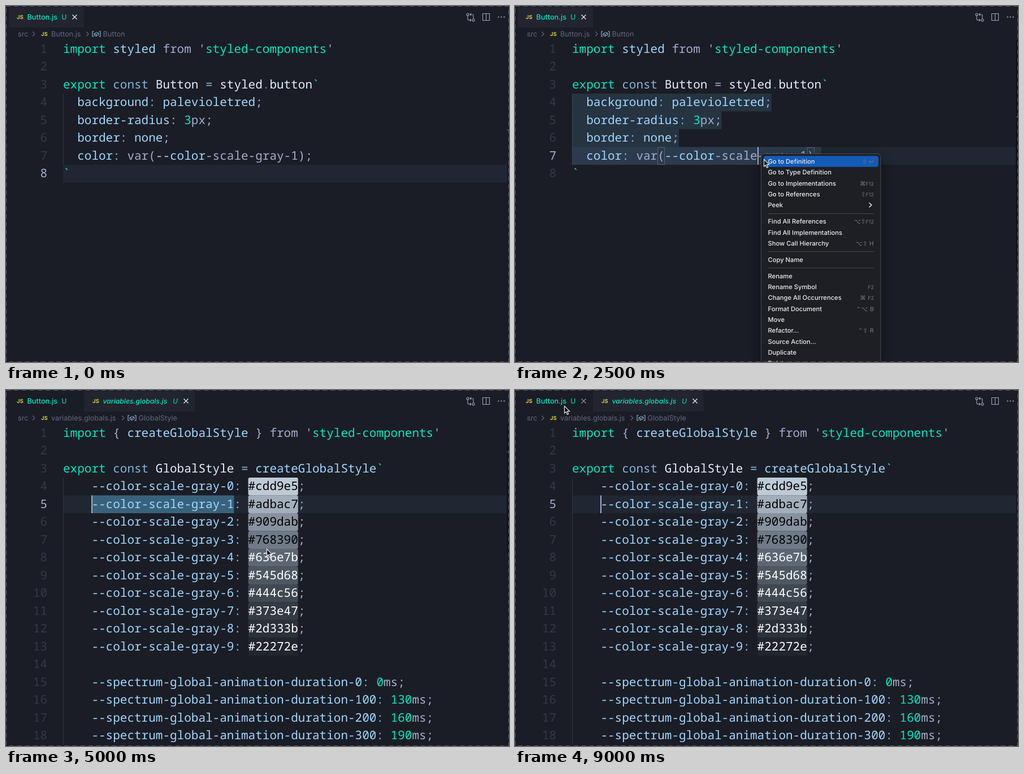
Write an HTML page with a canvas that moves like this. It is 890 px wide and 630 px high and loops after 9500 ms.

```html
<!DOCTYPE html>
<html lang="en">
<head>
<meta charset="utf-8">
<title>Go to definition</title>
<style>
html, body { margin: 0; width: 100%; height: 100%; overflow: hidden; background: #1a1d26; }
canvas { display: block; width: 890px; height: 630px; }
</style>
</head>
<body>
<canvas id="stage" width="890" height="630"></canvas>
<script>
const ctx = document.getElementById('stage').getContext('2d');
const LOOP = 9500, STEP = 250;
const LEFT = 101, TOP = 60.5, CELL = 12.6, LINE = 31.5;
const MONO = '500 21px "Noto Sans Mono", monospace';
const UI = 'Inter, sans-serif';
const MINT = '#05e6be', DIM = '#626780', ICON = '#a0a4b8';
const INK = { g: MINT, b: '#a0d8fd', t: '#a6accd', w: '#e4f0fb', c: '#86b4d8', d: '#767c9d' };

// Code lines: "§x" switches to ink x
const button = [
  "§gimport §bstyled §tfrom '§gstyled-components§t'",
  '',
  '§gexport §cconst §wButton §c= §wstyled§d.§wbutton§g`',
  '  §bbackground§c: §bpalevioletred§t;',
  '  §bborder-radius§c: §g3§tpx;',
  '  §bborder§c: §bnone§t;',
  '  §bcolor§c: §tvar(§b--color§t-scale-gray-1);',
  '§g`'
];
const grays = ['#cdd9e5', '#adbac7', '#909dab', '#768390', '#636e7b',
  '#545d68', '#444c56', '#373e47', '#2d333b', '#22272e'];
const globals = [
  "§gimport §t{ §bcreateGlobalStyle §t} from '§gstyled-components§t'",
  '',
  '§gexport §cconst §wGlobalStyle §c= §bcreateGlobalStyle§g`',
  ...grays.map((_, i) => `    §b--color-scale-gray-${i}§c:${' '.repeat(8)}§t;`),
  '',
  ...[0, 130, 160, 190].map((ms, i) =>
    `    §b--spectrum-global-animation-duration-${i * 100}§c: §g${ms}§tms;`)
];

const menu = [
  ['Go to Definition', '⇧ ↩'], ['Go to Type Definition', ''],
  ['Go to Implementations', '⌘F12'], ['Go to References', '⇧F12'], ['Peek', '>'], null,
  ['Find All References', '⌥⇧F12'], ['Find All Implementations', ''],
  ['Show Call Hierarchy', '⌥⇧ H'], null,
  ['Copy Name', ''], null,
  ['Rename', ''], ['Rename Symbol', 'F2'], ['Change All Occurrences', '⌘ F2'],
  ['Format Document', '⌃⌥ B'], ['Move', ''], ['Refactor...', '⌃⇧ R'],
  ['Source Action...', ''], ['Duplicate', ''], ['Delete', '']
];

// Pointer path: time, x, y
const path = [
  [250, 440, 290], [500, 431, 228], [750, 431, 232], [1250, 430, 268], [2250, 430, 268],
  [2500, 440, 271], [2750, 450, 274], [3500, 454, 277], [4000, 458, 294],
  [4250, 461, 281], [5000, 461, 281], [6000, 384, 206], [6250, 383, 202],
  [7500, 383, 202], [8750, 90, 32], [9000, 87, 28]
];

function pointerAt(t) {
  if (t < path[0][0]) return null;
  const i = path.findIndex(p => p[0] > t);
  if (i < 0) return path[path.length - 1].slice(1);
  const [a, b] = [path[i - 1], path[i]];
  const k = (t - a[0]) / (b[0] - a[0]);
  return [a[1] + (b[1] - a[1]) * k, a[2] + (b[2] - a[2]) * k];
}

function rect(x, y, w, h, color) {
  ctx.fillStyle = color;
  ctx.fillRect(x, y, w, h);
}

function round(x, y, w, h, r, color) {
  ctx.beginPath();
  ctx.roundRect(x, y, w, h, r);
  ctx.fillStyle = color;
  ctx.fill();
}

function text(str, x, y, font, color, align = 'left') {
  ctx.font = font;
  ctx.textAlign = align;
  ctx.fillStyle = color;
  ctx.fillText(str, x, y);
}

function stroke(d, color, width = 1) {
  ctx.strokeStyle = color;
  ctx.lineWidth = width;
  ctx.stroke(new Path2D(d));
}

const colX = col => LEFT + col * CELL;
const lineY = n => TOP + (n - 1) * LINE;
const baseline = n => lineY(n) + 22;

function codeLine(src, n) {
  let col = 0;
  src.split('§').forEach((part, i) => {
    const str = i ? part.slice(1) : part;
    if (str.trim()) text(str, colX(col), baseline(n), MONO, INK[part[0]]);
    col += str.length;
  });
}

const jsBadge = (x, y) => text('JS', x, y, `700 9.5px ${UI}`, '#cbcb41');
const chevron = (x, y, color) => stroke(`M${x - 2} ${y - 4}l4 4l-4 4`, color, 1.1);
const cross = (x, color) => stroke(`M${x - 4} 15.5l8 8m0 -8l-8 8`, color, 1.2);

function tab(x, name, nameEnd, italic) {
  const font = `${italic ? 'italic 500 12.2px' : '500 12.7px'} ${UI}`;
  jsBadge(x, 22.5);
  text(name, x + 18.5, 24, font, MINT);
  text('U', nameEnd + 6, 24, font, '#08bfa0');
}

function header(second, pointer) {
  if (second) rect(138, 2, 196, 36, '#22252f');
  else rect(5, 2, 133, 36, '#22252f');
  tab(19, 'Button.js', 92);
  if (second) {
    tab(153, 'variables.globals.js', 289, true);
    cross(318.5, '#e4f0fb');
    if (pointer && pointer[0] < 138 && pointer[1] < 38) cross(121.5, '#888da6');
  } else cross(121.5, '#e4f0fb');

  const font = `400 12.7px ${UI}`;
  const end = second ? 197 : 134;
  text('src', 21, 54, font, DIM);
  chevron(49, 49.5, DIM);
  jsBadge(62, 52.5);
  text(second ? 'variables.globals.js' : 'Button.js', 80, 54, font, DIM);
  chevron(end + 10, 49.5, DIM);
  const x = end + 18.5;
  stroke(`M${x + 3} 45h-2.5v9h2.5M${x + 12} 45h2.5v9h-2.5`, '#8fb8d8', 1.1);
  stroke(`M${x + 3.5} 49l4.5 -2.5l3.5 1.5v3l-4.5 2.5l-3.5 -1.5zl3.5 1.5l4.5 -2.5m-4.5 2.5v3`, '#8fb8d8', 1);
  text(second ? 'GlobalStyle' : 'Button', end + 37.5, 54, font, DIM);

  stroke('M817 17v6q0 2 2 2h4m-2 -2l2 2l-2 2M827 23v-6q0 -2 -2 -2h-4m2 -2l-2 2l2 2', ICON, 1.1);
  stroke('M815 15a2 2 0 1 0 4 0a2 2 0 1 0 -4 0M825 25a2 2 0 1 0 4 0a2 2 0 1 0 -4 0', ICON, 1.1);
  stroke('M843.5 13.5h12v12h-12zM849.5 13.5v12', ICON, 1.1);
  for (let i = 0; i < 3; i++) rect(870.5 + i * 5, 18.5, 2, 2, ICON);
}

function editor(lines, current) {
  rect(LEFT, lineY(current), 785, LINE, '#202733');
  const last = Math.min(lines.length, 18);
  rect(101, lineY(4), 1, (lines === button ? 4 : 15) * LINE, '#303441');
  for (let n = 1; n <= last; n++)
    text(n, 73, baseline(n), MONO, n === current ? '#a6accd' : '#343847', 'right');
}

function caret(col, n) {
  rect(Math.round(colX(col)), lineY(n), 2, LINE, '#a6accd');
}

function drawButton(t) {
  const current = t < 500 ? 8 : t < 1250 ? 6 : 7;
  editor(button, current);
  if (t >= 1500)
    [28, 21, 15, 35].forEach((len, i) =>
      rect(LEFT, lineY(4 + i), len * CELL, LINE, 'rgba(88,140,175,.2)'));
  if (current === 7) {
    ctx.strokeStyle = '#596070';
    ctx.lineWidth = 1;
    for (const col of [12, 33]) ctx.strokeRect(Math.round(colX(col)) + .5, 250.5, 12, 30);
  }
  button.forEach((src, i) => codeLine(src, i + 1));
  if (current === 6) caret(15, 6);
  if (current === 7) caret(26, 7);
  rect(886, { 8: 219, 6: 174, 7: 196 }[current], 4, 1, '#686d80');
}

function drawGlobals(t) {
  editor(globals, 5);
  if (t <= 5000) rect(colX(4), lineY(5), 20 * CELL, LINE, '#38627c');
  globals.forEach((src, i) => codeLine(src, i + 1));
  grays.forEach((hex, i) => {
    ctx.globalAlpha = .92;
    round(colX(26), lineY(i + 4), 7 * CELL, LINE, 3, hex);
    ctx.globalAlpha = 1;
    text(hex, colX(26), baseline(i + 4), MONO, i < 4 ? '#000' : '#fff');
  });
  if (t % 1000 < 500) caret(4, 5);
  rect(886, 109, 4, 1, '#686d80');
}

function drawMenu(pointer) {
  ctx.save();
  ctx.shadowColor = 'rgba(0,0,0,.5)';
  ctx.shadowBlur = 18;
  ctx.shadowOffsetY = 6;
  round(435.5, 261.5, 211.5, 390, 6, '#1d1f24');
  ctx.restore();
  ctx.strokeStyle = '#4b4d53';
  ctx.lineWidth = 1;
  ctx.stroke();
  let y = 275;
  for (const item of menu) {
    if (!item) {
      rect(448, Math.round(y - 5), 187, 1, '#45474c');
      y += 9.7;
      continue;
    }
    const [label, keys] = item;
    const hot = pointer[0] > 438 && Math.abs(pointer[1] - y) < 9.65;
    if (hot) round(440, y - 9.7, 203, 19.4, 4, '#145bb8');
    text(label, 447.5, y + 4, `500 11.2px ${UI}`, '#eceded');
    if (keys === '>') stroke(`M626.5 ${y - 4}l4.5 4l-4.5 4`, '#eceded', 1.5);
    else {
      const fkey = keys.match(/F\d+$/)?.[0] || '';
      const font = `9px ${UI}`;
      text(fkey, 635, y + 4, font, '#77797f', 'right');
      const w = fkey ? ctx.measureText(fkey).width : 0;
      text(keys.slice(0, keys.length - fkey.length), 635 - w, y + 4,
        '10.5px "DejaVu Sans", sans-serif', '#77797f', 'right');
    }
    y += 19.3;
  }
}

function drawPointer([x, y]) {
  ctx.save();
  ctx.translate(x, y);
  const arrow = new Path2D('M.5 .5V13L3.4 10.4L5.5 15.3L7.6 14.4L5.5 9.7H9.6Z');
  ctx.fillStyle = '#0b0b0d';
  ctx.fill(arrow);
  ctx.strokeStyle = '#e8e8ea';
  ctx.lineWidth = 1.2;
  ctx.stroke(arrow);
  ctx.restore();
}

function draw(t) {
  const pointer = pointerAt(t);
  const second = t >= 4750;
  ctx.textRendering = 'geometricPrecision';
  rect(0, 0, 890, 630, '#1a1d26');
  header(second, pointer);
  // The scrollbar shows while the pointer is over the editor
  if (pointer && pointer[1] > 60) rect(886, 60, 4, second ? 228 : 410, '#12141a');
  if (second) drawGlobals(t);
  else drawButton(t);
  if (t >= 1750 && t < 4500) drawMenu(pointer);
  ctx.setLineDash([8, 6]);
  ctx.strokeStyle = '#565962';
  ctx.lineWidth = 1;
  ctx.strokeRect(.5, .5, 889, 629);
  ctx.setLineDash([]);
  if (pointer) drawPointer(pointer);
}

const start = performance.now();
function tick() {
  const t = (performance.now() - start) % LOOP;
  draw(Math.floor(t / STEP) * STEP);
  requestAnimationFrame(tick);
}
tick();
</script>
</body>
</html>
```
